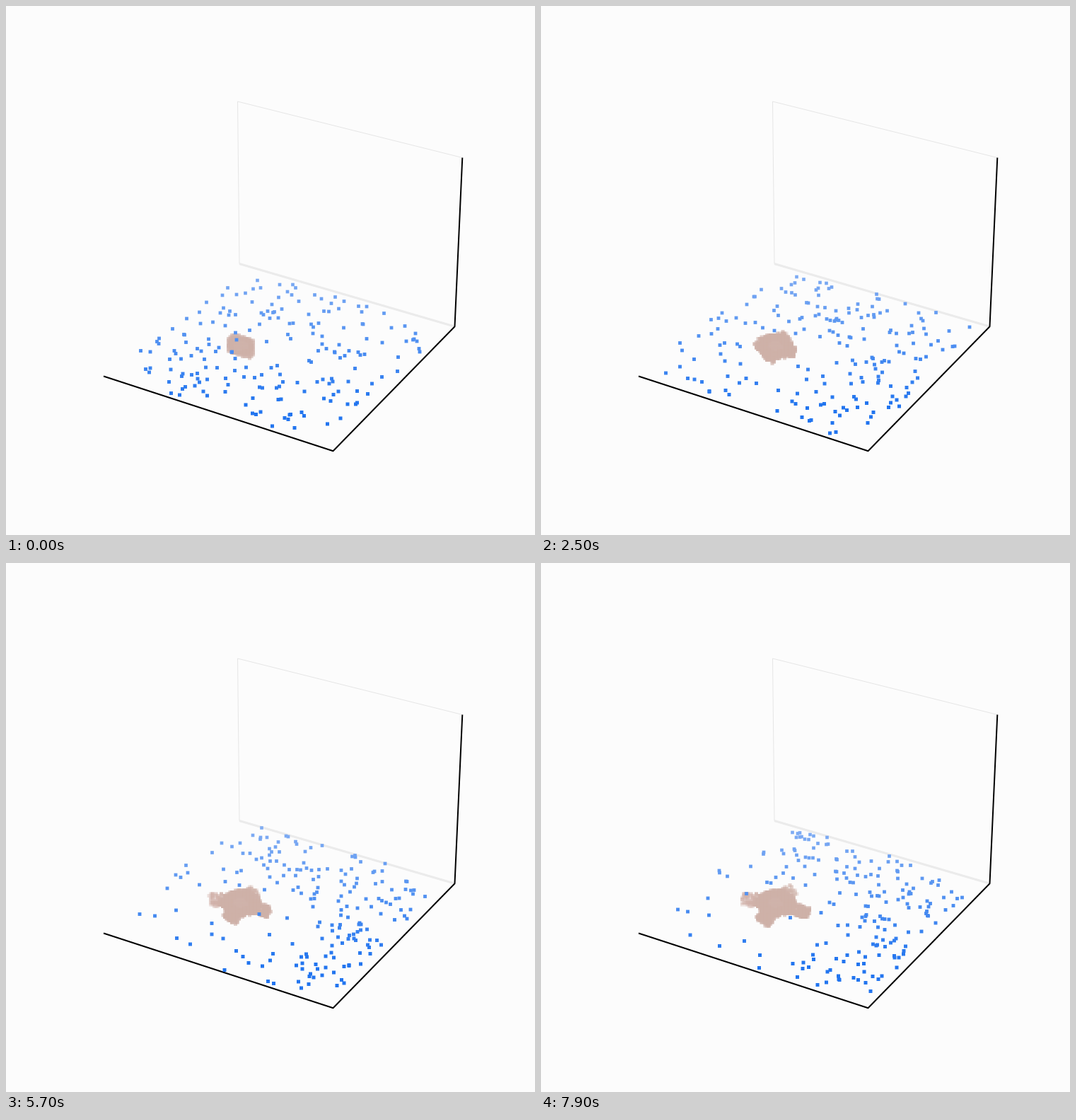
These frames come from a looping animation (748 px wide and 748 px high, 8 s). An HTML page with a canvas:

```html
<!DOCTYPE html>
<html lang="en">
<head>
<meta charset="utf-8">
<title>Crystal growth</title>
<style>
  html, body { margin: 0; width: 100%; height: 100%; overflow: hidden; background: #fcfcfc; }
  canvas { display: block; width: 748px; height: 748px; }
</style>
</head>
<body>
<canvas id="stage" width="748" height="748"></canvas>
<script>
const ctx = document.getElementById('stage').getContext('2d');
const STEP = 100, STEPS = 80, DOTS = 190;

let seed = 20731;
function rand() {
  seed = (seed + 0x6D2B79F5) | 0;
  let r = Math.imul(seed ^ (seed >>> 15), 1 | seed);
  r = (r + Math.imul(r ^ (r >>> 7), 61 | r)) ^ r;
  return ((r ^ (r >>> 14)) >>> 0) / 4294967296;
}
const spread = r => (rand() * 2 - 1) * r;
const mix = (a, b, k) => a + (b - a) * k;
const reflect = (x, max) => x < 0 ? -x : x > max ? 2 * max - x : x;
const near = (p, u, v) => Math.hypot(p.u - u, p.v - v);

// Corners of the room
const back = [330, 364.5], right = [634.5, 453.3], front = [462.5, 629.3], left = [138, 523.5];
const topLeft = [327.5, 135], topRight = [645.3, 214.5];

// Perspective map from the unit square to the floor
const floorPoint = (() => {
  const [dx1, dy1] = [right[0] - front[0], right[1] - front[1]];
  const [dx2, dy2] = [left[0] - front[0], left[1] - front[1]];
  const [sx, sy] = [0, 1].map(i => back[i] - right[i] + front[i] - left[i]);
  const den = dx1 * dy2 - dx2 * dy1;
  const g = (sx * dy2 - dx2 * sy) / den, h = (dx1 * sy - sx * dy1) / den;
  const axis = i => (u, v) =>
    ((right[i] * (1 + g) - back[i]) * u + (left[i] * (1 + h) - back[i]) * v + back[i]) / (1 + g * u + h * v);
  const x = axis(0), y = axis(1);
  return p => [x(p.u, p.v), y(p.u, p.v)];
})();

// Drifting particles: random walk, absorbed near the crystal and released far from it
const MAX_U = .965, MAX_V = .985;
function pick(accept) {
  for (;;) {
    const p = { u: rand() * MAX_U, v: rand() * MAX_V };
    if (accept(p)) return p;
  }
}
const startDot = () => pick(p =>
  near(p, .49, .5) < .55 && (near(p, .53, .52) > .16 || rand() < .55));
const releaseDot = () => pick(p => near(p, .48, .5) < .58 && near(p, .3, .68) > .4);
function walk(p) {
  const d = near(p, .3, .68) / .29;
  const risk = near(p, .34, .55) < .1 ? .15 : .036 * Math.exp(-d * d);
  if (rand() < risk) return releaseDot();
  return { u: reflect(p.u + spread(.018), MAX_U), v: reflect(p.v + spread(.018), MAX_V) };
}
const walks = [Array.from({ length: DOTS }, startDot)];
while (walks.length < STEPS) walks.push(walks[walks.length - 1].map(walk));

// Crystal cells, each with the time it appears
const centre = [332, 480.5];
const cells = [];
function addCell(x, y, birth, alpha) {
  const snap = n => Math.round(n / 2.5) * 2.5;
  cells.push({ x: centre[0] + snap(x), y: centre[1] + snap(y), birth, alpha });
}
// The seed is a small block seen at an angle
for (let x = -17.5; x <= 17.5; x += 2.5) {
  for (let y = -17.5; y <= 17.5; y += 2.5) {
    const slope = y - x * .3;
    if (Math.abs(slope) < 14.5 && x + y < 32 && x + y > -30) addCell(x, y, 0, .6);
  }
}
for (let i = 0; i < 460; i++) {
  const a = rand() * Math.PI * 2, k = .5 + rand() * .5;
  const birth = k < .62 ? 0 : (k - .62) * 8500 + rand() * 400;
  addCell(Math.cos(a) * 27 * k, Math.sin(a) * 19 * k, birth, .6);
}
const arms = [
  { x: -47, y: -6, width: 9, from: .42, time: 6000, alpha: .38, count: 150 },
  { x: 47, y: 15, width: 8, from: .42, time: 7000, alpha: .6, count: 250 },
  { x: -20, y: 28, width: 11, from: .55, time: 6900, alpha: .6, count: 230 },
  { x: 25, y: -20, width: 9, from: .6, time: 7000, alpha: .35, count: 100 }
];
for (const arm of arms) {
  const length = Math.hypot(arm.x, arm.y);
  for (let i = 0; i < arm.count; i++) {
    const f = mix(.3, 1, rand()), side = spread(arm.width) / length;
    const growth = (f - arm.from) / (1 - arm.from);
    const birth = Math.max(0, growth) * arm.time + Math.abs(side) * 2500 + rand() * 500;
    addCell(arm.x * f - arm.y * side, arm.y * f + arm.x * side, birth, f > .65 ? arm.alpha : .6);
  }
}

function line(color, width, ...points) {
  ctx.strokeStyle = color;
  ctx.lineWidth = width;
  ctx.beginPath();
  points.forEach(p => ctx.lineTo(...p));
  ctx.stroke();
}
function square(x, y, size) {
  ctx.fillRect(x - size / 2, y - size / 2, size, size);
}
function drawDot(p) {
  const [x, y] = floorPoint(p);
  const k = Math.min(1, Math.max(0, (y - 365) / 200));
  ctx.fillStyle = `rgb(${mix(134, 34, k)}, ${mix(176, 117, k)}, ${mix(243, 239, k)})`;
  square(Math.round(x * 2) / 2, Math.round(y * 2) / 2, mix(4.6, 5, k));
}

function draw(step) {
  ctx.fillStyle = '#fcfcfc';
  ctx.fillRect(0, 0, 748, 748);
  ctx.lineJoin = 'round';
  line('#e6e6e6', 1, back, topLeft, topRight);
  line('#ebebeb', 3, back, right);
  line('#000', 2, left, front, right, topRight);

  ctx.fillStyle = '#cfb1a9';
  for (const c of cells) {
    if (c.birth > step * STEP) continue;
    ctx.globalAlpha = c.alpha;
    square(c.x, c.y, 5);
  }
  ctx.globalAlpha = 1;
  walks[step].forEach(drawDot);
}

const start = performance.now();
function tick() {
  draw(Math.floor((performance.now() - start) / STEP) % STEPS);
  requestAnimationFrame(tick);
}
tick();
</script>
</body>
</html>
```
